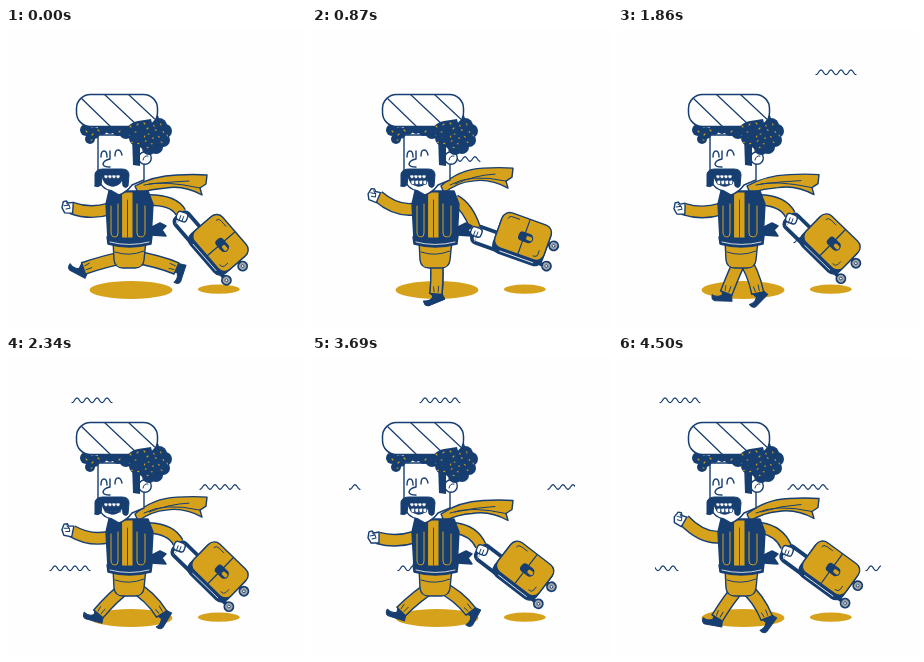
These frames come from a looping animation (300 by 300 pixels, 4.53 s). An HTML page with a canvas:

```html
<!DOCTYPE html>
<html lang="en">
<head>
<meta charset="utf-8">
<title>Traveller on the run</title>
<style>
html, body { margin: 0; width: 100%; height: 100%; overflow: hidden; background: #fefefe; }
canvas { display: block; width: 300px; height: 300px; }
</style>
</head>
<body>
<canvas id="stage"></canvas>
<script>
const NAVY = '#173e70', GOLD = '#d7a21b', WHITE = '#fefefe', GREY = '#a3a6a8';
const LOOP = 4530, HOLD = 150, STEP = 30, TAU = Math.PI * 2;
const canvas = document.getElementById('stage');
const ctx = canvas.getContext('2d');
const ratio = window.devicePixelRatio || 1;
canvas.width = canvas.height = 300 * ratio;

const swing = (n, period, shift = 0) => Math.cos(TAU * (n - shift) / period);
const rad = deg => deg * Math.PI / 180;

function paint(path, fill, stroke = NAVY, width = 1.4) {
  const p = typeof path === 'string' ? new Path2D(path) : path;
  if (fill) { ctx.fillStyle = fill; ctx.fill(p); }
  if (stroke) { ctx.strokeStyle = stroke; ctx.lineWidth = width; ctx.stroke(p); }
}
const line = (path, width = 1.4, color = NAVY) => paint(path, null, color, width);

function disc(x, y, rx, ry = rx) {
  const p = new Path2D();
  p.ellipse(x, y, rx, ry, 0, 0, TAU);
  return p;
}

function box(x, y, w, h, r) {
  const p = new Path2D();
  p.roundRect(x, y, w, h, r);
  return p;
}

function at(x, y, angle, draw) {
  ctx.save();
  ctx.translate(x, y);
  ctx.rotate(angle);
  draw();
  ctx.restore();
}

// A limb is a thick outlined stroke.
function limb(path, width) {
  ctx.lineCap = 'butt';
  line(path, width, NAVY);
  line(path, width - 2.8, GOLD);
  ctx.lineCap = 'round';
}

function gust(n, start, y) {
  for (let age = n - start; age > 0; age -= 38) {
    const left = age * 6;
    if (left > 263) continue;
    ctx.beginPath();
    for (let x = 0; x <= 40; x += 0.5) ctx.lineTo(left + x, y + 2.3 * Math.cos(TAU * x / 10));
    ctx.strokeStyle = NAVY;
    ctx.lineWidth = 1.2;
    ctx.stroke();
  }
}

function wind(n) {
  ctx.save();
  ctx.beginPath();
  ctx.rect(37, 0, 226, 300);
  ctx.clip();
  gust(n, 25, 44.3);
  gust(n, 3.67, 131);
  gust(n, 28.67, 212.3);
  ctx.restore();
}

function leg(s) {
  const angle = rad(80) * s * Math.abs(s) ** 0.6;
  const length = 38 + 11 * s * s;
  const x = 124 + length * Math.sin(angle), y = 228 + length * Math.cos(angle);
  const kneeX = 124 + (x - 124) * 0.6 + 2, kneeY = 228 + (y - 228) * 0.42;
  at(x, y, rad(-22 - 52 * s), () => {
    paint('M-4-3L5-4L6 8L-11 8Q-15 7-14 2Q-9 5-4 2Z', NAVY, NAVY, 1);
    line('M-1-3L2-3', 1.2, WHITE);
  });
  limb(`M124 228Q${kneeX} ${kneeY} ${x} ${y}`, 13.5);
  at(x, y, Math.atan2(kneeX - x, y - kneeY), () => {
    line('M-6 0L6 0', 1.5);
    line('M-2-2L-3-7M2-2L2-8', 0.9);
  });
}

function suitcase(sway) {
  const angle = rad(32 + 17 * sway);
  const x = 212.5 + 2 * sway, y = 211.2 + 3.8 * sway;
  at(x, y, angle, () => {
    paint(box(-48, 5, 48, 17, 5), null, NAVY, 3.8);
    line('M-44 6L-44 21', 0.8, GREY);
    for (const wheelY of [-1.5, 20]) {
      line(`M25 ${wheelY}L32 ${wheelY}`, 4);
      paint(disc(32, wheelY, 4.5), GREY, NAVY, 1.8);
      paint(disc(32, wheelY, 1.4), WHITE, NAVY, 0.8);
    }
    paint(box(-26, -17, 52, 41, 8), NAVY);
    line('M-17 21.5L18 21.5', 0.8, WHITE);
    paint(box(-26, -18.5, 52, 37, 8), GOLD);
    line('M1-18L1 18', 1.2);
    line('M-20-12Q-20-15-16-15L-9-15M20 8L20 12Q20 15 16 15', 0.9);
    paint(box(-4, -4, 13, 8, 3), NAVY);
    paint(box(3, -2.5, 7, 5, 2), GOLD, NAVY, 1);
  });
  const c = Math.cos(angle), s = Math.sin(angle);
  return [x - 45 * c - 11 * s, y - 45 * s + 11 * c];
}

function pullingArm([x, y]) {
  limb(`M143 172Q${x - 9} ${171 + (y - 186) * 0.45} ${x - 2} ${y - 4}`, 12);
  at(x, y, rad(20), () => {
    paint(box(-6, -4, 11, 9, 3), WHITE);
    line('M-2 0L-2 5M1 0L1 5', 0.9);
  });
}

function frontArm(drop) {
  const y = 172 + 9 * drop;
  limb(`M103 181Q84 ${185 + 2 * drop} 66 ${y + 1}`, 13);
  at(62, y, rad(15 - 15 * drop), () => {
    paint('M5-5L5 6L-3 6L-6 1L-5-5L-2-6L0-4Z', WHITE);
    line('M-4-1L1-2L2 1L-2 2M-2-4L1-2', 1);
  });
}

function scarf(lift) {
  const y = 143.5 + 3.5 * lift;
  paint(`M129 158Q147 ${y + 1} 171 ${y}Q188 ${y - 1} 201 ${y}L200 ${y + 9}L194 ${y + 13}L196 ${y + 20}
    Q178 ${y + 10} 160 ${y + 13}Q146 ${y + 14} 132 165Z`, GOLD);
  line(`M138 157Q158 ${y + 5} 194 ${y + 13}M143 156Q163 ${y + 7} 183 ${y + 6}`, 1);
}

function torso() {
  paint('M146 199L154 195L160 198L156 202L160 208L145 207Z', NAVY);
  paint('M107 212L140 212L138 232Q137 240 129 240L117 240Q109 240 108 232Z', GOLD);
  line('M109 224Q123 229 138 223', 1);
  paint('M103 163L142 163L147 176L145 212L102 212L100 176Z', NAVY);
  paint('M116 164L127 164L127 210L116 210Z', GOLD, NAVY, 1);
  line('M121.5 172L121.5 209', 0.9);
  line('M105 178L105 204Q105 209 109 209Q112 209 112 205L112 176', 1, GOLD);
  line('M131 176L131 205Q131 209 135 209Q139 209 139 204L139 178', 1, GOLD);
  paint('M101 209Q123 215 146 208L145 216Q123 222 102 216Z', NAVY);
  line('M104 214Q123 219 143 214', 0.8, WHITE);
}

function mouth(close) {
  paint('M96 146L117 146Q116 158 106 158Q97 157 96 146Z', NAVY);
  const top = [98, 102, 106, 110];
  for (const x of top) paint(box(x, 147, 4, 3.5, [0, 0, 2, 2]), WHITE, NAVY, 0.7);
  if (close > 0) {
    const y = 156 - 4 * close;
    for (const x of [99, 103, 107, 111]) paint(box(x, y, 3.7, 4.5 * close, 1.5), WHITE, NAVY, 0.7);
  }
}

function hair() {
  const tufts = [[80, 102, 6], [88, 105, 6], [84, 111, 5], [96, 102, 5], [104, 101, 5], [112, 102, 6],
    [120, 104, 7], [126, 96, 8], [136, 95, 7], [146, 91, 7], [153, 98, 8], [159, 103, 7], [157, 112, 7],
    [150, 119, 7], [143, 111, 12], [131, 110, 8], [143, 120, 7]];
  for (const [x, y, r] of tufts) paint(disc(x, y, r), NAVY, null);
  for (let i = 0; i < 24; i++) {
    const a = i * 2.4, r = Math.sqrt(i / 24);
    const x = 142 + 21 * r * Math.cos(a), y = 106 + 15 * r * Math.sin(a);
    line(`M${x} ${y}l${Math.cos(i * 2)} ${Math.sin(i * 2)}`, 1.1, GOLD);
  }
  line('M80 103l1 1M86 107l1-1M92 102l1 1M85 112l1 0M113 104l1-1', 1.1, GOLD);
}

function head(close) {
  paint('M92 107L92 148Q94 161 106 163L113 167Q121 164 126 157L138 152L138 107Z', WHITE);
  paint(disc(139, 130, 6.3), WHITE);
  line('M137 132Q138 127 142 128', 1);
  paint('M126 108L134 108L134 138L127 137Z', NAVY, null);
  hair();
  paint(box(70.5, 66.5, 81, 32, 14), WHITE, NAVY, 1.5);
  ctx.save();
  ctx.clip(box(71, 67, 80, 31, 14));
  line('M74 69L105 99M98 66L133 99M122 66L153 95', 1.3);
  ctx.restore();
  paint('M117 104Q124 94 132 93L145 91L148 103L130 110Z', NAVY, null);
  line('M124 98l1 1M131 97l1-1M138 95l1 1M129 104l1 0M141 101l1-1', 1.1, GOLD);
  line('M95 129Q95 123 98 123Q101 123 101 129M109 128Q109 122 112 122Q115 122 116 127', 1.4);
  line('M104 123L104 131Q98 132 97 136Q97 139 104 139', 1.4);
  paint('M89 158L89 146Q90 141 97 141L116 141Q123 141 123 147L122 158Q120 161 117 158L116 148L96 148L95 157Q92 160 89 158Z', NAVY, NAVY, 1);
  mouth(close);
}

function render(ms) {
  const t = ms % LOOP;
  const n = t < HOLD ? 0 : 1 + Math.floor((t - HOLD) / STEP);
  const stride = Math.sin(Math.PI * (n - 7.3) / 17.8);
  const jaw = Math.sin(TAU * (n - 2.7) / 47);
  const close = Math.max(0, Math.min(1, 0.5 + 4 * jaw));

  ctx.setTransform(ratio, 0, 0, ratio, 0, 0);
  ctx.lineCap = ctx.lineJoin = 'round';
  ctx.fillStyle = WHITE;
  ctx.fillRect(0, 0, 300, 300);
  paint(disc(125, 262, 41.5, 9), GOLD, null);
  paint(disc(212.8, 261.2, 20.8, 4.6), GOLD, null);
  wind(n);
  const grip = suitcase(swing(n, 66));
  leg(stride);
  leg(-stride);
  scarf(swing(n, 54));
  pullingArm(grip);
  frontArm(swing(n, 56, 6));
  torso();
  head(close);
}

const start = performance.now();
function tick() {
  render(performance.now() - start);
  requestAnimationFrame(tick);
}
tick();
</script>
</body>
</html>
```
